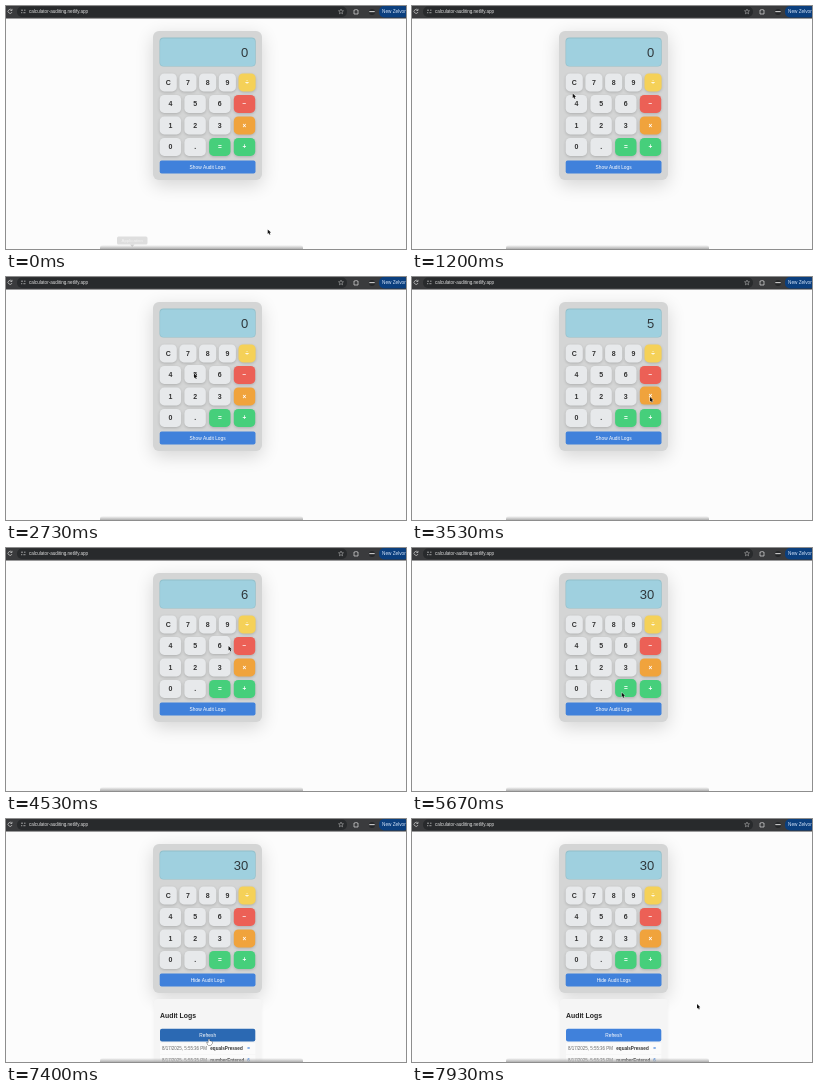
An HTML page with a canvas that plays this animation: 400 by 243 pixels, repeating every 8 s.

```html
<!DOCTYPE html>
<html lang="en">
<head>
<meta charset="utf-8">
<title>Calculator</title>
<style>
html, body { margin: 0; overflow: hidden; background: #fcfcfc; }
canvas { display: block; }
</style>
</head>
<body>
<canvas id="stage" width="400" height="243"></canvas>
<script>
const ctx = document.getElementById('stage').getContext('2d');
const LOOP = 8000;
const FONT = '"Liberation Sans", Arial, sans-serif';
const GREY = '#e7e9eb', GREEN = '#46cf7b';

// Pointer tip: time, x, y
const path = [
  [0, 261.7, 223.4], [670, 261.7, 223.4], [1200, 160.7, 87.5], [1450, 162, 79],
  [1750, 162, 79], [2300, 187, 97], [2730, 188, 96.5], [3050, 188, 97],
  [3500, 238, 120], [3850, 238, 120], [4150, 216, 99], [4380, 217, 98],
  [4530, 222.5, 98], [4930, 212, 143], [5670, 209.7, 144.5], [5870, 209.7, 144.5],
  [6250, 190, 158.5], [7020, 190, 158.5], [7300, 203, 220], [7480, 203, 220],
  [7870, 285, 185], [LOOP, 285, 185]
];
const display = [[0, '0'], [2900, '5'], [4330, '6'], [5250, '30']];
const SHOW = 6430, REFRESH = 7400;

const keys = [];
function addRow(row, labels, colors, x, step, w) {
  [...labels].forEach((label, i) => keys.push({
    label, color: colors[i] || GREY, x: x + i * step, y: 67.4 + row * 21.5, w, h: 18
  }));
}
addRow(0, 'C789÷', { 4: '#f5d158' }, 153.7, 19.7, 17.1);
addRow(1, '456−', { 3: '#ec6056' }, 153.7, 24.7, 21.4);
addRow(2, '123×', { 3: '#f0a33c' }, 153.7, 24.7, 21.4);
addRow(3, '0.=+', { 2: GREEN, 3: GREEN }, 153.7, 24.7, 21.4);

function box(x, y, w, h, r, fill, blur = 0, dy = 0, alpha = 0) {
  ctx.save();
  ctx.shadowColor = `rgba(0,0,0,${alpha})`;
  ctx.shadowBlur = blur;
  ctx.shadowOffsetY = dy;
  ctx.fillStyle = fill;
  ctx.beginPath();
  ctx.roundRect(x, y, w, h, r);
  ctx.fill();
  ctx.restore();
}

function text(str, x, y, size, color, align = 'left', weight = 400) {
  ctx.font = `${weight} ${size}px ${FONT}`;
  ctx.fillStyle = color;
  ctx.textAlign = align;
  ctx.fillText(str, x, y);
}

function stroke(d, color, width = 0.7) {
  ctx.strokeStyle = color;
  ctx.lineWidth = width;
  ctx.stroke(new Path2D(d));
}

function pointerAt(t) {
  const i = path.findIndex(p => p[0] > t);
  const [a, b] = [path[i - 1], path[i]];
  const u = (t - a[0]) / (b[0] - a[0]);
  const e = u * u * (3 - 2 * u);
  return { x: a[1] + (b[1] - a[1]) * e, y: a[2] + (b[2] - a[2]) * e };
}

const inside = (p, r) => p.x >= r.x && p.x <= r.x + r.w && p.y >= r.y && p.y <= r.y + r.h;

function wideButton(r, label, p) {
  const hover = inside(p, r);
  box(r.x, r.y, r.w, r.h, 2, hover ? '#2b69b3' : '#4081db');
  text(label, r.x + r.w / 2, r.y + r.h / 2 + 1.7, 4.8, '#fff', 'center');
  return hover;
}

function browserBar() {
  box(0, 0, 400, 12.5, 0, '#3a3b3d');
  box(11, 0.5, 330, 10.5, 5, '#282a2c');
  stroke('M5.8 4.3A2 2 0 1 0 6 6M6 2.8V4.5H4.3', '#ccc');
  stroke('M15 4.2H17M18 4.2H19.5M15 6.7H16.3M17.4 6.7H19.5', '#ccc');
  text('calculator-auditing.netlify.app', 23, 7.4, 4.6, '#dedede');
  stroke('M335 3L335.7 4.7L337.5 4.8L336.1 6L336.6 7.8L335 6.8L333.4 7.8L333.9 6L332.5 4.8L334.3 4.7Z', '#bbb', 0.5);
  stroke('M348 4H349.3A.8 .8 0 0 1 350.8 4H352V8H348Z', '#ddd');
  box(363, 3, 6, 6, 3, '#26282a');
  stroke('M363.3 5.6H368.7', '#ccc', 1.1);
  box(373, 0, 30, 11.5, 5, '#0b3f7e');
  text('New Zelvor', 376, 7.4, 4.7, '#d5e5fb');
}

function calculator(t, p) {
  box(147, 25, 109, 149, 6, '#d4d5d5', 18, 5, 0.16);
  box(153.5, 31.5, 96.2, 29, 4, '#91bfca');
  box(154.1, 32.4, 95, 27.6, 3.5, '#9fd0df');
  text(display.findLast(d => d[0] <= t)[1], 242.3, 51.1, 13, '#30383c', 'right');
  for (const k of keys) {
    const y = k.y - (inside(p, k) ? 0.8 : 0);
    box(k.x, y, k.w, k.h, 4.5, k.color, 3, 1, 0.18);
    const op = '÷−×=+'.includes(k.label);
    text(k.label, k.x + k.w / 2, y + (op ? 11.2 : 11.5), op ? 6.5 : 7,
      op ? '#fff' : '#333', 'center', 700);
  }
  const toggle = { x: 153.7, y: 154.5, w: 95.8, h: 13 };
  return wideButton(toggle, (t < SHOW ? 'Show' : 'Hide') + ' Audit Logs', p);
}

function logRow(y, time, name, value) {
  box(154, y, 95.3, 11, 0, '#fbfbfb');
  text(`8/17/2025, ${time} PM`, 156, y + 7.1, 4.45, '#666');
  text(name, 204.3, y + 7.1, 4.6, '#333', 'left', 700);
  text(value, 241.3, y + 7.1, 4.6, '#4081db', 'left', 700);
}

function logs(t, p) {
  if (t < SHOW) return false;
  const filled = t >= REFRESH;
  const x = filled ? 154 : 177.2;
  if (filled) box(148, 180, 107.5, 70, 3, '#f5f5f5', 4, 1, 0.04);
  else box(171, 182.5, 61, 51.5, 3, '#f4f4f4', 4, 1, 0.05);
  text('Audit Logs', x, filled ? 199.4 : 199, 6.9, '#222', 'left', 700);
  if (!filled) {
    text('No audit logs available', x, 209.7, 4.8, '#333');
    return wideButton({ x: 177.2, y: 215.8, w: 48.8, h: 12.8 }, 'Refresh', p);
  }
  logRow(224, '5:55:36', 'equalsPressed', '=');
  logRow(235.7, '5:55:35', 'numberEntered', '6');
  return wideButton({ x: 154, y: 209.8, w: 95.3, h: 12.7 }, 'Refresh', p);
}

function dock(t) {
  if (t < 100) {
    box(111, 230.5, 30.5, 8, 1.5, '#dedede');
    text('Application', 126.2, 236, 4.4, '#f2f2f2', 'center');
    ctx.fillStyle = '#d2d2d2';
    ctx.fill(new Path2D('M124 238.5H128.5L126.2 241Z'));
  }
  const g = ctx.createLinearGradient(0, 239, 0, 243);
  g.addColorStop(0, '#b0b0b000');
  g.addColorStop(1, '#b0b0b0');
  box(94, 239, 203, 6, 3, g);
}

function pointer(p, hand) {
  ctx.save();
  ctx.translate(p.x, p.y);
  const shape = new Path2D(hand
    ? 'M-.6 .4Q0-.4 .6 .4V2L3 2.6V4.5L2.2 6H-.8L-2.2 3.6L-.6 3.8Z'
    : 'M0 0V4.6L1.1 3.7L1.9 5.4L2.7 5L1.9 3.4L3.3 3.2Z');
  ctx.lineJoin = 'round';
  ctx.lineWidth = 0.7;
  ctx.strokeStyle = hand ? '#222' : '#fff';
  ctx.fillStyle = hand ? '#fff' : '#111';
  ctx.stroke(shape);
  ctx.fill(shape);
  ctx.restore();
}

function draw(now) {
  const t = now % LOOP;
  const p = pointerAt(t);
  box(0, 0, 400, 243, 0, '#fcfcfc');
  browserBar();
  const overToggle = calculator(t, p);
  const overRefresh = logs(t, p);
  dock(t);
  pointer(p, overToggle || overRefresh);
}

let start;
function tick(now) {
  start ??= now;
  draw(now - start);
  requestAnimationFrame(tick);
}
draw(0);
requestAnimationFrame(tick);
</script>
</body>
</html>
```
